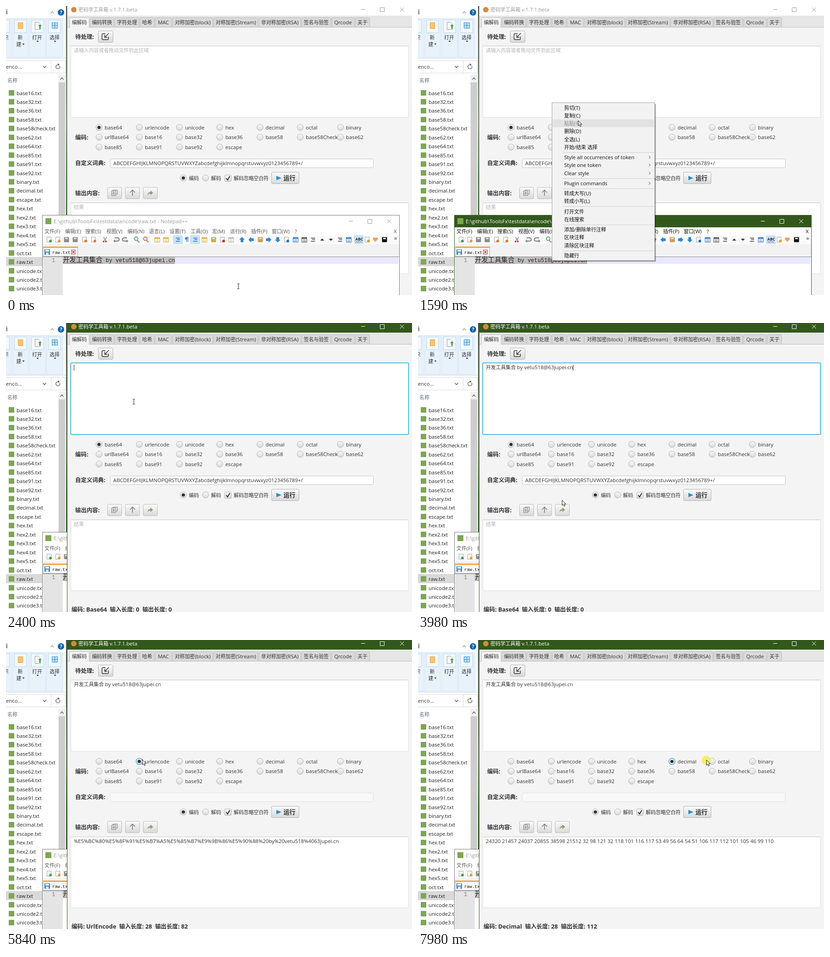
These frames come from a looping animation (886x632 px, 8 s). An HTML page:

```html
<!DOCTYPE html>
<html lang="zh">
<head>
<meta charset="utf-8">
<title>Encoding toolbox</title>
<style>
html, body { margin: 0; width: 100%; height: 100%; overflow: hidden; background: #fff; }
svg { display: block; }
text { white-space: pre; font-family: "Open Sans", "Noto Sans CJK SC", "Noto Sans CJK JP", sans-serif; }
.mono { font-family: "Liberation Mono", "Noto Sans CJK SC", "Noto Sans CJK JP", monospace; }
</style>
</head>
<body>
<svg id="stage" width="886" height="632" viewBox="0 0 886 632"></svg>
<script>
const GREEN = '#33581b', BLUE = '#039ed3';
const message = '开发工具集合 by vetu518@63jupei.cn';

// Encoders, in the order of the first radio buttons
const bytes = [...new TextEncoder().encode(message)];
const hex = (n, len) => n.toString(16).padStart(len, '0');
const codes = [...message].map(c => c.charCodeAt(0));
const encoders = [
  ['Base64', btoa(String.fromCharCode(...bytes))],
  ['UrlEncode', encodeURIComponent(message)],
  ['Unicode', codes.map(c => '\\u' + hex(c, 4)).join('')],
  ['Hex', bytes.map(b => hex(b, 2)).join('')],
  ['Decimal', codes.join(' ')]
];

// Drawing helpers
const cjk = /[\u3000-\u9fff]+/g;
const text = (x, y, s, fill = '#333', size = 11.3, attr = '', ratio = .965) =>
  `<text x="${x}" y="${y}" fill="${fill}" font-size="${size}" ${attr}>` +
  s.replace(cjk, m => `<tspan font-size="${size * ratio}">${m}</tspan>`) + '</text>';
const bold = (x, y, s, size = 12.9) => text(x, y, s, '#333', size, 'font-weight="700"');
const mid = (x, y, s, fill) => text(x, y, s, fill, 11.3, 'text-anchor="middle"');
const box = (x, y, w, h, fill, stroke, r = 0) => stroke
  ? `<rect x="${x + .5}" y="${y + .5}" width="${w - 1}" height="${h - 1}" rx="${r}" fill="${fill}" stroke="${stroke}"/>`
  : `<rect x="${x}" y="${y}" width="${w}" height="${h}" rx="${r}" fill="${fill}"/>`;
const line = (d, stroke = '#444', width = 1, attr = '') =>
  `<path d="${d}" fill="none" stroke="${stroke}" stroke-width="${width}" ${attr}/>`;
const shape = (d, fill) => `<path d="${d}" fill="${fill}"/>`;
const dot = (x, y, r, fill, attr = '') => `<circle cx="${x}" cy="${y}" r="${r}" fill="${fill}" ${attr}/>`;
const group = (x, y, s, attr = '') => `<g transform="translate(${x} ${y})" ${attr}>${s}</g>`;
const chevron = (x, y, dir, c = '#555') => line(`M${x - 3.5} ${y + 2 * dir}l3.5 ${-4 * dir}l3.5 ${4 * dir}`, c, 1.2);
const controls = (xs, y, c) => line(
  `M${xs[0] - 4} ${y + .5}h9M${xs[1] - 4.5} ${y - 3.5}h9v9h-9zM${xs[2] - 4} ${y - 3.5}l8.5 8.5m0 -8.5l-8.5 8.5`, c);

const defs = `<defs>
  <linearGradient id="btn" x2="0" y2="1"><stop stop-color="#fafafa"/><stop offset="1" stop-color="#d9d9d9"/></linearGradient>
  <linearGradient id="hover" x2="0" y2="1"><stop stop-color="#fff"/><stop offset="1" stop-color="#e8e8e8"/></linearGradient>
  <linearGradient id="desk" x2="0" y2="1"><stop stop-color="#49524a"/><stop offset=".4" stop-color="#7f8a72"/><stop offset=".6" stop-color="#2d6a22"/><stop offset="1" stop-color="#243a20"/></linearGradient>
</defs>`;

const files = ('base16 base32 base36 base58 base58check base62 base64 base85 base91 base92 binary decimal ' +
  'escape hex hex2 hex3 hex4 hex5 oct raw unicode unicode2 unicode3').split(' ');

function explorer() {
  let s = box(0, 0, 131, 632, '#fff') + box(131, 0, 3, 632, 'url(#desk)') +
    mid(-1, 17, '看') + chevron(101, 14, 1, '#999') + dot(120, 14, 7, '#0a63b0') +
    text(117.4, 18, '?', '#fff', 11, 'font-weight="700"') +
    box(0, 26, 131, 89, '#f5f6f7') + box(0, 114, 131, 1, '#dadbdc');
  for (const [x, w] of [[-24, 36], [14, 35], [51, 36], [88, 36]])
    s += box(x, 27, w, 86, '#e8f2fb', '#cfe3f5') + box(x + 4, 30, w - 8, 29, '#f3f8fd', '#b9d5ec');
  s += box(26, 36, 11, 14, '#fbc56d', '#e2a23e') +
    shape('M63 35h8l4 4v13h-12z', '#fff') + line('M63.500 35.500h7.500l4 4v12h-11.500z', '#999') +
    shape('M70 44l4-4 4 4h-2.500v6h-3v-6z', '#3aa34a') +
    box(100, 36, 13, 13, '#2f8fd8') + box(101, 37, 5, 5, '#bfe0f8') + box(107, 37, 5, 5, '#bfe0f8') +
    box(101, 43, 5, 5, '#bfe0f8') + box(107, 43, 5, 5, '#bfe0f8') +
    mid(0, 73, '识') + mid(31, 73, '新') + mid(28, 88, '建') + mid(68, 73, '打开') + mid(106, 73, '选择');
  for (const [x, y] of [[38, 82], [69, 76], [107, 76]]) s += shape(`M${x - 2.5} ${y}h5l-2.500 3z`, '#333');
  s += box(-2, 119, 133, 28, '#fff', '#d9d9d9') + box(98, 119, 1, 28, '#d9d9d9') +
    text(0, 137, 'enco...') + chevron(84, 133, -1) +
    line('M117 130.500a4.500 4.500 0 1 1 -3.500 -2', '#555', 1.2) + shape('M113 125.500l4 2.800-4 2.500z', '#555') +
    text(3, 167, '名称', '#5a6a80') +
    box(114, 150, 16, 482, '#f0f0f0') + box(115, 167, 14, 465, '#cdcdcd') + chevron(122, 159, 1) +
    box(0, 549, 114, 20, '#d9d9d9');
  files.forEach((name, i) => {
    const y = 190.5 + i * 19.45;
    s += box(6, y - 6.5, 12, 12, '#7da653') + text(23, y + 4, name + '.txt', '#222');
  });
  return s;
}

const tabs = [[138, 44, '编解码'], [183, 53, '编码转换'], [237, 54, '字符处理'], [292, 32, '哈希'], [325, 37, 'MAC'],
  [363, 89, '对称加密(block)'], [453, 97, '对称加密(Stream)'], [551, 93, '非对称加密(RSA)'],
  [645, 64, '签名与验签'], [710, 51, 'Qrcode'], [762, 32, '关于']];
const options = ['base64 urlencode unicode hex decimal octal binary',
  'urlBase64 base16 base32 base36 base58 base58Check base62', 'base85 base91 base92 escape'].map(r => r.split(' '));

const button = (x, y, w, h, fill = 'url(#btn)', stroke = '#b3b3b3') => box(x, y, w, h, fill, stroke, 2.5);
const glow = (x, y, w, h, r) => `<rect x="${x}" y="${y}" width="${w}" height="${h}" rx="${r}" fill="none" stroke="${BLUE}" stroke-opacity=".3" stroke-width="3"/>`;
const area = (y, h) => box(141, y, 738, h, '#fff', '#dcdcdc', 1.5) + box(142, y, 736, 1, '#c4c4c4');
const radio = (x, y, on, focus) => (focus ? dot(x, y, 7.7, '#9fd6ea') : '') +
  dot(x, y, 6.7, 'url(#btn)', `stroke="${focus ? BLUE : '#b0b0b0'}"`) + (on ? dot(x, y, 3.6, '#33303a') : '');

function app(s) {
  const ink = s.app ? '#fff' : '#999';
  let o = box(133, 0, 753, 632, '#f4f4f4') + box(133, 0, 753, 21, s.app ? GREEN : '#fff') +
    box(133, 0, 1, 632, s.app ? GREEN : '#a8a8a8') + dot(148, 8, 6, '#d28b3f') +
    text(158, 11.5, '密码学工具箱 v.1.7.1.beta', ink) + controls([779, 821, 864], 7, ink) +
    box(134, 21, 752, 26, '#e6e6e6') + box(134, 46, 752, 1, '#bdbdbd');
  tabs.forEach(([x, w, label], i) => {
    o += box(x, 25, w, 22, i ? '#dadada' : '#f4f4f4', '#bcbcbc', 2) + mid(x + w / 2, 40, label);
  });
  o += box(139, 46, 42, 2, '#f4f4f4') + bold(151, 72, '待处理:') + button(201, 54, 33, 26) +
    line('M217 60.500h-5.500q-2 0-2 2v9q0 2 2 2h10q2 0 2-2v-4.500', '#333', 1.4) +
    line('M224.500 59.500l-9 9m0-5.500v5.500h5.500', '#333', 1.4);

  o += s.focus ? glow(141.5, 87.5, 737, 156, 2) + box(141, 87, 738, 157, '#fff', BLUE, 1.5) : area(87, 157);
  o += s.pasted ? text(148, 101, message) : s.focus ? '' : text(148, 101, '请输入内容或者拖动文件到此区域', '#b3b3b3');
  if (s.caret) o += box(s.pasted ? 338 : 148, 91, 1, 13, '#222');

  options.forEach((row, j) => row.forEach((label, i) => {
    const x = 203 + 87.8 * i, y = 265.5 + 21.5 * j, on = !j && i === s.mode;
    o += radio(x, y, on, on && s.mode > 0) + text(x + 12.3, y + 4.3, label);
  }));
  o += bold(151, 292, '编码:') + bold(151, 348, '自定义词典:') +
    (s.mode ? box(227, 334, 575, 20, '#f8f8f8', '#e0e0e0', 2)
      : box(227, 334, 575, 20, '#fff', '#c4c4c4', 2) +
        text(234, 348, 'ABCDEFGHIJKLMNOPQRSTUVWXYZabcdefghijklmnopqrstuvwxyz0123456789+/'));
  o += radio(387, 376, true) + text(399, 380.5, '编码') + radio(435.5, 376, false) + text(447.5, 380.5, '解码') +
    box(477, 369, 15, 15, 'url(#btn)', '#b0b0b0', 2) + line('M480.500 376.500l3 4 5-8.500', '#333', 2) +
    text(497, 380.5, '解码忽略空白符') +
    (s.runFocus ? glow(580, 363.5, 59.5, 25.5, 3) : '') +
    button(579, 363, 61, 26, s.hover ? 'url(#hover)' : 'url(#btn)', s.runFocus ? BLUE : '#b3b3b3') +
    shape('M590 371.500l11 4.800-11 4.800z', '#2a8ed0') + bold(605.5, 381, '运行', 13.6);

  o += bold(151, 414, '输出内容:');
  for (const x of [221, 260, 299]) o += button(x, 396, 32, 26, 'url(#btn)', '#bdbdbd');
  o += line('M233.500 405v-2.500h9.500v9h-2.500M230.500 404.500h9v10h-9zM232.500 407.500h5M232.500 409.500h5M232.500 411.500h5', '#777') +
    line('M276 415v-12M270.500 408l5.500-5.500 5.500 5.500', '#777', 1.5) +
    shape('M309 414q0-7 6-7v-3.500l6 5-6 5v-3.500q-4 0-6 4z', '#8e9b7c') + area(430, 156);
  const [name, out] = encoders[s.mode];
  if (s.output) out.match(/.{1,117}/g).forEach((l, i) => o += text(148, 443.5 + 15 * i, l));
  else o += text(148, 443.5, '结果', '#b3b3b3');
  return o + bold(143, 631, `编码: ${name}  输入长度: ${s.output ? 28 : 0}  输出长度: ${s.output ? out.length : 0}`);
}

// Toolbar icons: x, kind, colour
const icons = ('94 page #3da546,113 page #e0a030,132 disk #8c8c8c,151 disk #8c8c8c,171 page #e07b2a,191 page #e07b2a,' +
  '216 cut #c43a3a,241 undo #8c8c8c,260 redo #8c8c8c,285 zoom #3c9a55,305 zoom #d0583c,330 pane #d9a83a,349 pane #d9a83a,' +
  '375 rows #2a6fc0,394 para #3b7bc8,413 rows #2a6fc0,433 pane #d9a83a,453 disk #c9ad4e,472 page #c0392b,491 pane #b9b0a0,' +
  '515 up #2a86d8,535 left #2a86d8,555 disk #c8a25a,573 right #2a86d8,593 down #2a86d8,612 page #2a6fc0,632 pane #2a6fc0,' +
  '651 pane #444,670 rows #444,690 tri #333,709 inv #333,729 rows #444,748 pane #2a6fc0,788 page #e0a030,' +
  '806 heart #f0a060,826 disk #111').split(',').map(i => i.split(' '));
const arrow = (c, turn) => `<path d="M0 -6l6 6h-3v5.500h-6v-5.500h-3z" fill="${c}" transform="rotate(${turn})"/>`;
const kinds = {
  page: c => box(-5, -6, 10, 12, '#fff', '#a5a5a5') + dot(3, 3, 3, c),
  disk: c => box(-5.5, -5.5, 11, 11, c, '', 1) + box(-3, -4, 6, 3, '#ddd'),
  pane: c => box(-6, -5, 12, 11, '#fff', c) + box(-6, -5, 12, 3, c) + line('M-3.500 .500h7M-3.500 3.500h7', c),
  rows: c => line('M-4.500 -3.500h9M-2 -.500h6.500M-4.500 3.500h9', c, 1.5),
  cut: c => line('M-3 -6l4 8M4 -6l-5 8', '#777', 1.3) + dot(-3, 4, 2, c) + dot(2, 4, 2, c),
  undo: c => line('M-4 -4h6q4 0 4 3.500t-4 3.500h-7', c, 2.4) + shape('M-7 3l4-4v8z', c),
  redo: c => line('M4 -4h-6q-4 0-4 3.500t4 3.500h7', c, 2.4) + shape('M7 3l-4-4v8z', c),
  zoom: c => line('M1 1l5 5', '#888', 2) + dot(-1, -2, 4, '#dfeaf5', `stroke="${c}" stroke-width="1.500"`),
  para: c => line('M0 -5v10M3 -5v10M4 -5h-5', c, 1.3) + dot(-1, -2.5, 2.5, c),
  up: c => arrow(c, 0), right: c => arrow(c, 90), down: c => arrow(c, 180), left: c => arrow(c, 270),
  tri: c => shape('M-4.500 2l4.500-4.500 4.500 4.500z', c),
  inv: c => shape('M-4.500 -2l4.500 4.500 4.500-4.500z', c),
  heart: c => shape('M0 5l-5.500-6q0-4 3-4 2 0 2.500 2 .500-2 2.500-2 3 0 3 4z', c)
};
const menuBar = [[84, '文件(F)'], [129, '编辑(E)'], [173, '搜索(S)'], [219, '视图(V)'], [265, '编码(N)'], [312, '语言(L)'],
  [357, '设置(T)'], [403, '工具(O)'], [450, '宏(M)'], [489, '运行(R)'], [535, '插件(P)'], [580, '窗口(W)'], [630, '?'], [846, 'X']];
const wave = (x, n) => line(`M${x} 563.500` + 'l1.500 -1.500l1.500 1.500'.repeat(n), '#e04040', .7);

function editor(s) {
  const ink = s.npp ? '#fff' : '#999', label = s.npp ? '#111' : '#555';
  let o = box(79, 457, 780, 190, '#fff', s.npp ? GREEN : '#777') + box(80, 458, 778, 26, s.npp ? GREEN : '#fff') +
    box(86, 464, 13, 13, '#7da653') +
    text(104, 474.5, 'E:\\github\\ToolsFx\\testdata\\encode\\raw.txt - Notepad++', ink, 11.45) +
    controls([752, 794, 836], 470, ink) + box(80, 502, 778, 46, '#f2f2f2') + box(80, 502, 778, 19, '#fafafa');
  for (const [x, item] of menuBar) o += text(x, 497, item, label);
  for (const x of [375, 413, 770]) o += box(x - 10, 502, 20, 18, '#cce5fb', '#a5cff3');
  for (const [x, kind, c] of icons) o += group(x, 511, kinds[kind](c));
  o += text(762.5, 513, 'ABC', '#222', 8.3, 'font-weight="700"') + line('M763 517l2-2 2 2 2-2 2 2 2-2 2 2 2-2', '#d03030') +
    text(847, 512, '»', '#333', 13) +
    box(81, 526, 76, 22, '#f7f7f7', '#b0b0b0') + box(81, 526, 76, 3, '#f7a540') +
    box(84, 532, 12, 12, '#3d86c6', '', 1) + box(86, 533, 8, 4, '#fff') + box(87, 539, 6, 5, '#cfe2f2') +
    text(101, 542, 'raw.txt', '#111', 9.4, 'class="mono"') +
    box(142, 533, 10, 10, '#fff', '#a04050') + line('M144.500 535.500l5 5m0-5l-5 5', '#b02838', 1.5) +
    box(80, 548, 778, 1, '#8a8a8a') + box(81, 549, 43, 83, '#e4e4e4') + box(124, 549, 732, 15, '#e8e8ff') +
    box(124, 549, 245, 15, '#c0c0c0') +
    text(100, 560, '1', '#808080', 12, 'class="mono"') +
    text(124, 560, message, '#222', 12, 'class="mono"', 1.2) + wave(124, 29) + wave(239, 43);
  return o;
}

const items = [[223, '剪切(T)'], [240, '复制(C)'], [257, '粘贴(P)'], [274, '删除(D)'], [292, '全选(L)'], [309, '开始/结束 选择'],
  [331, 'Style all occurrences of token', 1], [348, 'Style one token', 1], [366, 'Clear style', 1], [388, 'Plugin commands', 1],
  [410, '转成大写(U)'], [427, '转成小写(L)'], [450, '打开文件'], [467, '在线搜索'],
  [489, '添加/删除单行注释'], [506, '区块注释'], [524, '清除区块注释'], [546, '隐藏行']];

function contextMenu(s) {
  let o = group(0, 0, box(295, 214, 224, 345, '#000', '', 1), 'opacity=".35"') + box(292, 211, 225, 346, '#f2f2f2', '#a5a5a5');
  if (s.pick != null) o += box(294, items[s.pick][0] - 9, 221, 17, '#e2e2e2');
  items.forEach(([y, label, sub], i) => {
    o += text(319, y + 4, label, i === 2 ? '#8a8a8a' : '#111');
    if (sub) o += line(`M504 ${y - 3}l2.800 2.800-2.800 2.800`, '#333');
  });
  for (const y of [320, 377, 399, 438, 478, 535]) o += box(316, y, 199, 1, '#cfcfcf');
  return group(0, 0, o, `opacity="${s.menu}"`);
}

function pointer(s) {
  const [x, y] = s.at;
  return (s.halo ? dot(x, y + 1, 10, '#f4ee30', 'opacity=".7"') : '') + group(x, y, s.beam
    ? line('M-2.500 -5.500h2l.500 .500.500 -.500h2M0 -5v10M-2.500 5.500h2l.500 -.500.500 .500h2', '#222')
    : '<path d="M.5 .5v11.500l2.700-2.400 2 4.200 1.900-.9-2-4.100h3.500z" fill="#fff" stroke="#222"/>');
}

// Start time in ms and what changes then
const steps = [
  [0, { at: [507, 613], beam: 1, mode: 0 }],
  [260, { at: [312, 574], beam: 0 }],
  [530, { at: [292, 556] }],
  [800, { menu: .8, npp: 1 }],
  [1070, { menu: 1 }],
  [1320, { at: [346, 267], pick: 3 }],
  [1590, { at: [349, 250], pick: 2 }],
  [1860, { at: [343, 239], pick: 1 }],
  [2120, { at: [283, 186], beam: 1, menu: 0 }],
  [2400, { at: [279, 172], app: 1, npp: 0, focus: 1, caret: 1 }],
  [2670, { at: [289, 187], caret: 0 }],
  [2930, { pasted: 1, caret: 1 }],
  [3190, { caret: 0 }],
  [3450, { caret: 1 }],
  [3720, { at: [300, 320], beam: 0, caret: 0 }],
  [3980, { at: [314, 387], caret: 1 }],
  [4250, { at: [480, 380], caret: 0 }],
  [4510, { at: [610, 374], hover: 1, caret: 1 }],
  [4780, { focus: 0, caret: 0, runFocus: 1, output: 1 }],
  [5050, { at: [470, 330], hover: 0 }],
  [5310, { at: [281, 279] }],
  [5580, { at: [291, 264], runFocus: 0, mode: 1 }],
  [5840, { at: [297, 261] }],
  [6370, { at: [390, 262] }],
  [6640, { mode: 2 }],
  [6920, { at: [464, 260], halo: 1 }],
  [7190, { at: [466, 262], halo: 0, mode: 3 }],
  [7450, { at: [520, 262] }],
  [7710, { at: [555, 260], mode: 4 }],
  [7980, { at: [629, 262], halo: 1 }]
];
let state = {};
const states = steps.map(([, change]) => state = { ...state, ...change });

const stage = document.getElementById('stage'), start = performance.now();
let shown = -1;
function frame() {
  const t = (performance.now() - start) % 8000;
  const i = steps.findLastIndex(([time]) => time <= t);
  if (i !== shown) {
    const s = states[shown = i];
    stage.innerHTML = defs + explorer() + (s.app ? editor(s) + app(s) : app(s) + editor(s)) +
      (s.menu ? contextMenu(s) : '') + pointer(s);
  }
  requestAnimationFrame(frame);
}
frame();
</script>
</body>
</html>
```
